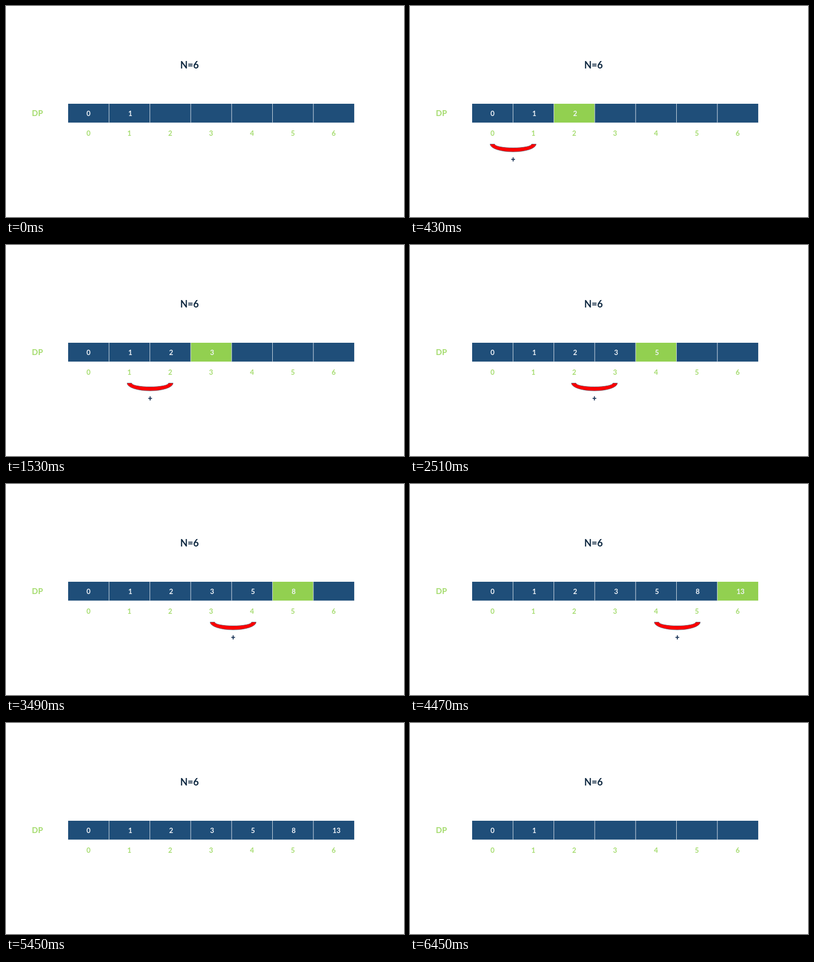
An HTML page for the animation above (6.89 s loop, 743 px wide and 395 px high).

```html
<!DOCTYPE html>
<html lang="en">
<head>
<meta charset="utf-8">
<title>DP table</title>
<style>
  html, body { margin: 0; width: 100%; height: 100%; overflow: hidden; background: #fff; }
  svg { display: block; width: 100%; height: 100%; }
  text { font: 700 13px Lato, "Open Sans", sans-serif; text-anchor: middle; }
  .title { font-size: 18px; fill: #0c263f; }
  .name { font-size: 15px; fill: #a6dc70; }
  .index { fill: #a6dc70; }
  .value { fill: #f0f4f8; }
  .plus { font-size: 14px; font-weight: 900; fill: #1b3558; }
  .divider { stroke: #c9d5e0; stroke-width: 1; }
  .arc { fill: #fe0000; stroke: #5b6478; stroke-width: .8; }
</style>
</head>
<body>
<svg viewBox="0 0 743 395">
  <text class="title" x="342.5" y="116.5">N=6</text>
  <text class="name" x="58.7" y="206">DP</text>
  <g id="table"></g>
  <g id="sum">
    <path class="arc" d="M-43 258.5A43 14.5 0 0 0 43 258.5H34.5A34.5 7 0 0 1 -34.5 258.5Z"/>
    <text class="plus" x="0" y="292.3">+</text>
  </g>
</svg>
<script>
const LOOP = 6890;
const LEFT = 116, TOP = 183, CELL = 76.3, HEIGHT = 35.3;
const BLUE = '#1f4e79', GREEN = '#92d050';
const values = [0, 1, 2, 3, 5, 8, 13];
const valueX = [154, 232, 308.3, 384.7, 461, 537, 617];

// start time, filled cells, centre of the sum bracket (none: all cells blue)
const steps = [
  [0, 2],
  [430, 3, 192.5],
  [1530, 4, 269],
  [2510, 5, 344.3],
  [3490, 6, 424],
  [4470, 7, 499],
  [5450, 7],
  [6450, 2]
];

const table = document.getElementById('table');
const sum = document.getElementById('sum');

function add(tag, attrs, label = '') {
  const el = document.createElementNS('http://www.w3.org/2000/svg', tag);
  for (const key in attrs) el.setAttribute(key, attrs[key]);
  el.textContent = label;
  return table.appendChild(el);
}

const boxes = values.map((_, i) =>
  add('rect', { x: LEFT + i * CELL, y: TOP, width: CELL, height: HEIGHT }));

const labels = values.map((value, i) => {
  const x = LEFT + i * CELL;
  if (i) add('line', { class: 'divider', x1: x, x2: x, y1: TOP, y2: TOP + HEIGHT });
  add('text', { class: 'index', x: x + CELL / 2 - 0.2, y: 242.5 }, i);
  return add('text', { class: 'value', x: valueX[i], y: 206.3 }, value);
});

let shown;

function draw(now) {
  const time = now % LOOP;
  const step = steps.findLast(([start]) => start <= time);
  if (step !== shown) {
    shown = step;
    const [, filled, center] = step;
    boxes.forEach((box, i) =>
      box.setAttribute('fill', center && i === filled - 1 ? GREEN : BLUE));
    labels.forEach((label, i) =>
      label.setAttribute('visibility', i < filled ? 'visible' : 'hidden'));
    sum.setAttribute('visibility', center ? 'visible' : 'hidden');
    sum.setAttribute('transform', `translate(${center || 0} 0)`);
  }
}

const begin = performance.now();
function tick() {
  draw(performance.now() - begin);
  requestAnimationFrame(tick);
}
tick();
</script>
</body>
</html>
```
